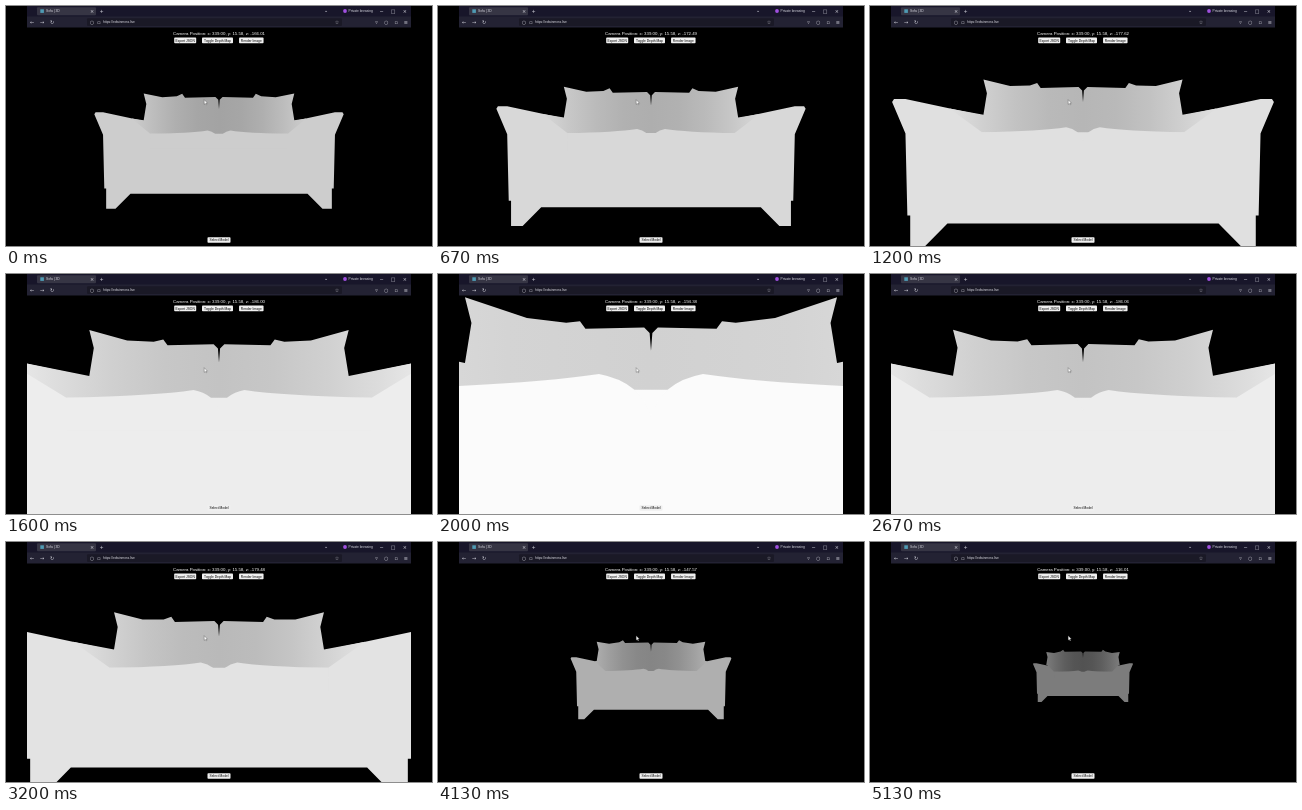
An HTML page that plays this animation: 426x240 px, repeating every 5.19 s.

```html
<!DOCTYPE html>
<html lang="en">
<head>
<meta charset="utf-8">
<title>Sofa viewer</title>
<style>
  html, body { margin: 0; width: 100%; height: 100%; overflow: hidden; background: #000; }
  svg { display: block; width: 100vw; height: 100vh; }
  text { font: 3.3px "Liberation Sans", Arial, sans-serif; fill: #dcdce4; }
  .icon { font: 5px "DejaVu Sans", sans-serif; text-anchor: middle; }
  .button { fill: #000; text-anchor: middle; }
  #label { font-size: 4.35px; fill: #fff; text-anchor: middle; }
</style>
</head>
<body>
<svg viewBox="0 0 426 240">
  <defs>
    <clipPath id="page"><rect x="21" y="22" width="384" height="218"/></clipPath>
    <linearGradient id="shade"></linearGradient>
  </defs>
  <rect width="426" height="240"/>
  <g clip-path="url(#page)">
    <path id="body"/>
    <path id="back" fill="url(#shade)"/>
    <path id="seat"/>
  </g>

  <rect x="21" width="384" height="11" fill="#18162a"/>
  <rect x="21" y="10.5" width="384" height="11" fill="#232233"/>
  <rect x="31" y="1.3" width="59" height="8" rx="1" fill="#363544"/>
  <rect x="81" y="12.3" width="255" height="7.6" rx="1" fill="#1a1926"/>
  <rect x="34.3" y="3.3" width="3.6" height="3.6" fill="#4f9bb4"/>
  <circle cx="339" cy="5" r="1.9" fill="#a050e0"/>
  <text x="40" y="6.4">Sofa | 3D</text>
  <text x="97" y="17.4">https://edwinmora.live</text>
  <text x="342.5" y="6.3">Private browsing</text>
  <g id="controls"></g>

  <text id="label" x="213" y="29.3"></text>
  <path d="M198.2 93.7v4.6l1.1-.9.7 1.5.8-.4-.7-1.4h1.3z" fill="#fff" stroke="#222" stroke-width=".3"/>
</svg>

<script>
const $ = id => document.getElementById(id);
const LOOP = 5190, STEP = 200 / 3;
const SHADES = 8;

// Scrolling stops twice: [start, length]. The keys are [scrolling time, distance].
const pauses = [[3670, 200], [4670, 130]];
const keys = [[0, 166.01], [1200, 177.62], [2000, 194.38], [3200, 179.48], [3930, 147.57], [4800, 116.01]];

// Left halves of the outlines, as [x, y, depth]
const OUTER = .0034, INNER = .0061, SEAT = .0007;
const mirror = half => [...half, ...half.map(([x, y, d]) => [-x, y, d]).reverse()];
const bodyPts = mirror([
  [-.2, -.045], [-.93, -.2], [-.99, -.2], [-1, -.185], [-.93, -.02], [-.92, .41],
  [-.905, .41], [-.905, .573], [-.83, .573], [-.71, .452]
]);
const backPts = mirror([
  [-.6, -.03, SEAT], [-.7, -.151], [-.86, -.195, OUTER], [-.83, -.38, OUTER], [-.86, -.5, OUTER],
  [-.71, -.5, .0045], [-.57, -.555, .0055], [-.52, -.615, INNER], [-.48, -.56, INNER],
  [-.05, -.57, INNER], [-.01, -.53, INNER], [0, -.4, INNER]
]);

const controls = $("controls");
function icons(glyphs, x, gap, y) {
  [...glyphs].forEach((g, i) => {
    controls.innerHTML += `<text class="icon" x="${x + i * gap}" y="${y}">${g}</text>`;
  });
}
function button(name, x, y, w) {
  controls.innerHTML += `<rect x="${x - w / 2}" y="${y}" width="${w}" height="5.6" rx=".8" fill="#f0f0f0"/>
    <text class="button" x="${x}" y="${y + 3.9}">${name}</text>`;
}
icons("×+", 86, 9.5, 6.6);
icons("⌄", 320, 0, 5.6);
icons("−□×", 375.5, 11.7, 6.6);
icons("←→↻", 26, 10, 18);
icons("○▫", 86, 7, 18);
icons("☆", 331, 0, 18);
icons("▿○▫≡", 370.5, 9.8, 18);
button("Export JSON", 179.2, 31.6, 22);
button("Toggle Depth Map", 211.5, 31.6, 31);
button("Render Image", 245.3, 31.6, 24.5);
button("Select Model", 213, 231.2, 23);

for (let i = 0; i <= SHADES; i++) $("shade").innerHTML += `<stop offset="${i / SHADES}"/>`;
const stops = [...$("shade").children];

function distance(t) {
  const m = pauses.reduce((rest, [at, len]) => rest - Math.max(0, Math.min(len, t - at)), t);
  const i = Math.max(1, keys.findIndex(([at], n) => at >= m || n === keys.length - 1));
  const [t0, a] = keys[i - 1], [t1, b] = keys[i];
  return a + (b - a) * Math.min(1, (m - t0) / (t1 - t0));
}

function grey(v) {
  v = Math.round(Math.min(255, v));
  return `rgb(${v},${v},${v})`;
}

function draw(t) {
  const z = distance(Math.round(Math.floor((t + 4) / STEP) * STEP / 10) * 10);
  const near = .02 - .0002396 * (z - 116.01);
  const p = ([x, y, d = 0]) =>
    (213 + x / (near + d)).toFixed(2) + " " + (131.3 + y / (near + d)).toFixed(2);
  const s = (x, y) => p([x, y, SEAT]);
  const outline = pts => "M" + pts.map(p).join("L") + "Z";

  $("body").setAttribute("d", outline(bodyPts));
  $("back").setAttribute("d", outline(backPts));
  $("seat").setAttribute("d",
    `M${s(-.6, -.03)}Q${s(-.25, -.037)} ${s(-.1, -.06)}Q${s(-.02, -.045)} ${s(0, .022)}` +
    `Q${s(.02, -.045)} ${s(.1, -.06)}Q${s(.25, -.037)} ${s(.6, -.03)}V240H${s(-.6, 0).split(" ")[0]}Z`);
  // The seat front never reaches below the frame of the body.
  $("seat").setAttribute("d", $("seat").getAttribute("d").replace("V240", "V" + s(0, .1).split(" ")[1]));

  const tone = 124 + 1.62 * (z - 116);
  $("body").setAttribute("fill", grey(tone));
  $("seat").setAttribute("fill", grey(tone));
  stops.forEach((stop, i) =>
    stop.setAttribute("stop-color", grey(tone - 42 * Math.sin(Math.PI * i / SHADES))));
  $("label").textContent = `Camera Position: x: 339.00, y: 15.58, z: -${z.toFixed(2)}`;
}

const start = performance.now();
function tick() {
  draw((performance.now() - start) % LOOP);
  requestAnimationFrame(tick);
}
tick();
</script>
</body>
</html>
```
